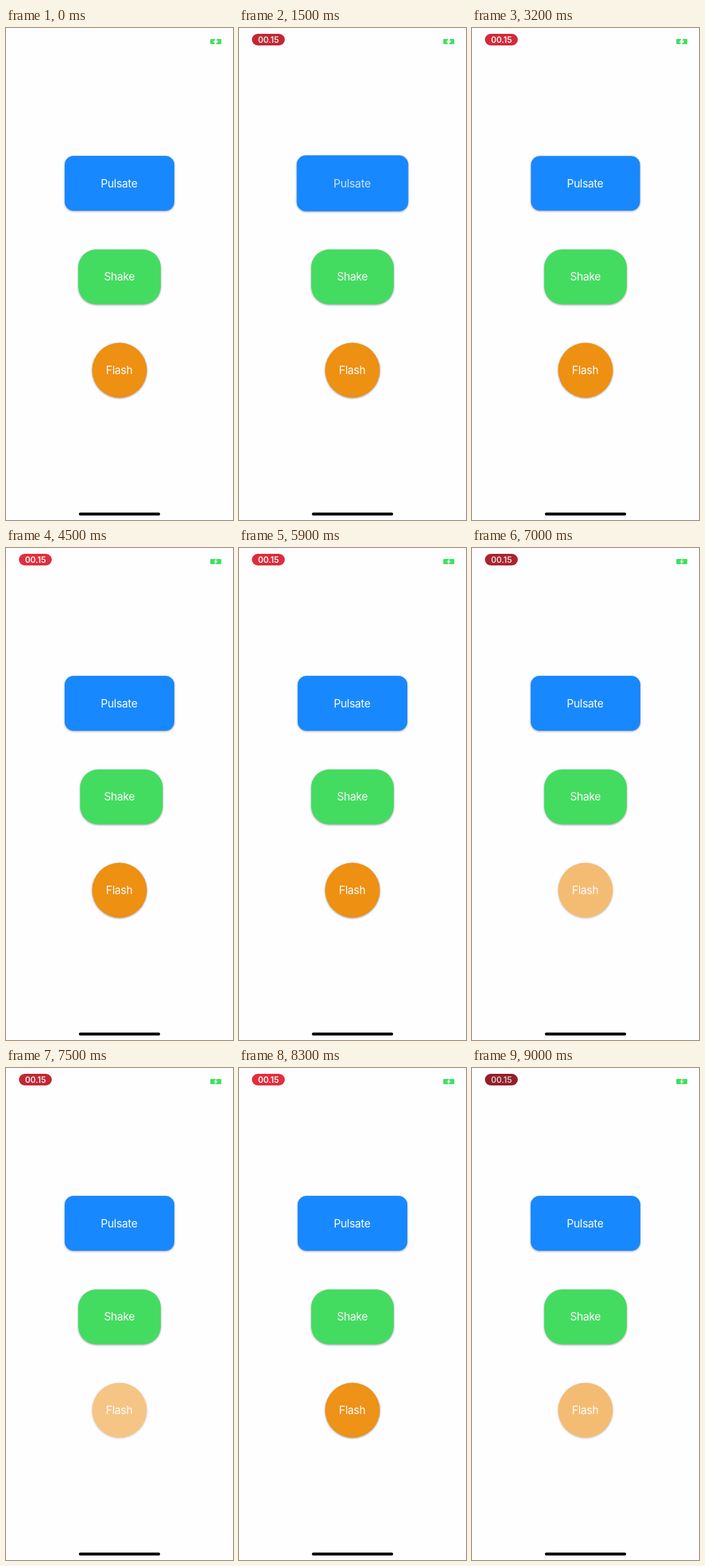
An HTML page that plays this animation: 352 px wide and 762 px high, repeating every 9.1 s.

```html
<!DOCTYPE html>
<html lang="en">
<head>
<meta charset="utf-8">
<title>Button animations</title>
<style>
  html, body { margin: 0; width: 100%; height: 100%; overflow: hidden; background: #fefdff; }
  svg { display: block; width: 352px; height: 762px; }
  text { font: 16.9px Inter, Roboto, sans-serif; letter-spacing: -.25px; fill: #fff; text-anchor: middle; }
  #time { font-size: 12.7px; font-weight: 600; letter-spacing: 0; }
  .button { filter: drop-shadow(.5px 1.2px 1.4px rgba(0, 0, 0, .4)); }
</style>
</head>
<body>
<svg viewBox="0 0 352 762">
  <g id="pill">
    <rect id="pillFill" x="20" y="9" width="51" height="18" rx="9"/>
    <text id="time" x="45.7" y="22.6">00.15</text>
  </g>
  <rect x="316.7" y="17" width="17.2" height="8" rx="1.3" fill="#3fe05f"/>
  <path id="bolt" d="M326.3 16.5 322.7 21.4H325L323.9 25.5 327.8 20.5H325.5Z" fill="#fefdff" stroke="#fefdff"/>

  <g id="pulsate" class="button">
    <rect x="91" y="198" width="170" height="85" rx="14" fill="#1888ff"/>
    <text id="pulsateLabel" x="175.4" y="246.9">Pulsate</text>
  </g>
  <g class="button">
    <rect id="shake" x="112" y="343" width="128" height="85" rx="28" fill="#43dc60"/>
  </g>
  <text x="175.8" y="391.4">Shake</text>
  <g id="flash">
    <g class="button"><circle cx="176" cy="530" r="42.5" fill="#ee9012"/></g>
    <text x="175.6" y="536.2">Flash</text>
  </g>

  <rect x="113" y="750.6" width="126" height="4.4" rx="2.2"/>
</svg>
<script>
const LOOP = 9.1, STEP = 0.1;
const $ = id => document.getElementById(id);
const mix = (a, b, k) => a + (b - a) * k;
const clamp = x => Math.min(1, Math.max(0, x));
const gray = v => `rgb(${v},${v},${v})`;

// Local time of an autoreversing animation, or null when it is not running.
function pingPong(t, start, duration, repeats) {
  const local = t - start;
  if (local < 0 || local >= 2 * duration * repeats) return null;
  const phase = local % (2 * duration);
  return phase < duration ? phase : 2 * duration - phase;
}

// Underdamped spring from 0 to 1: stiffness 100, damping 1, mass 1.
function spring(t) {
  return 1 - Math.exp(-t) * (Math.cos(10 * t) + 0.05 * Math.sin(10 * t));
}

// cubic-bezier(.42, 0, .58, 1)
function easeInOut(x) {
  let low = 0, high = 1, u = x;
  for (let i = 0; i < 20; i++) {
    u = (low + high) / 2;
    const bx = 3 * u * (1 - u) * (0.42 * (1 - u) + 0.58 * u) + u ** 3;
    if (bx < x) low = u; else high = u;
  }
  return u * u * (3 - 2 * u);
}

function draw(t) {
  const dim = ((1 + Math.cos(2 * Math.PI * t / 1.8)) / 2) ** 3;
  $('pill').style.display = t < STEP / 2 ? 'none' : '';
  $('pillFill').style.fill =
    `rgb(${mix(228, 148, dim)},${mix(45, 30, dim)},${mix(60, 42, dim)})`;
  $('time').style.fill = gray(mix(255, 208, dim));
  $('bolt').setAttribute('stroke-width', t < 3.25 ? 1.6 : 0.3);

  const pulse = pingPong(t, 1.295, 0.6, 2);
  const scale = pulse === null ? 1 : mix(0.95, 1, spring(pulse));
  $('pulsate').setAttribute('transform',
    `translate(176 240.5) scale(${scale}) translate(-176 -240.5)`);
  $('pulsateLabel').style.opacity = t < 1.25 ? 1 : clamp(0.35 + (t - 1.3) * 2.1);

  const shake = pingPong(t, 4.418, 0.1, 2);
  const shift = shake === null ? 0 : mix(-4.7, 4.7, shake / 0.1);
  $('shake').setAttribute('x', 112 + shift);

  const flash = pingPong(t, 6.237, 0.5, 3);
  $('flash').style.opacity = flash === null ? 1 : mix(1, 0.1, easeInOut(flash / 0.5));
}

// The picture advances ten times a second.
function tick() {
  const t = performance.now() / 1000 % LOOP;
  draw(Math.floor(t / STEP + 1e-6) * STEP);
  requestAnimationFrame(tick);
}
tick();
</script>
</body>
</html>
```
